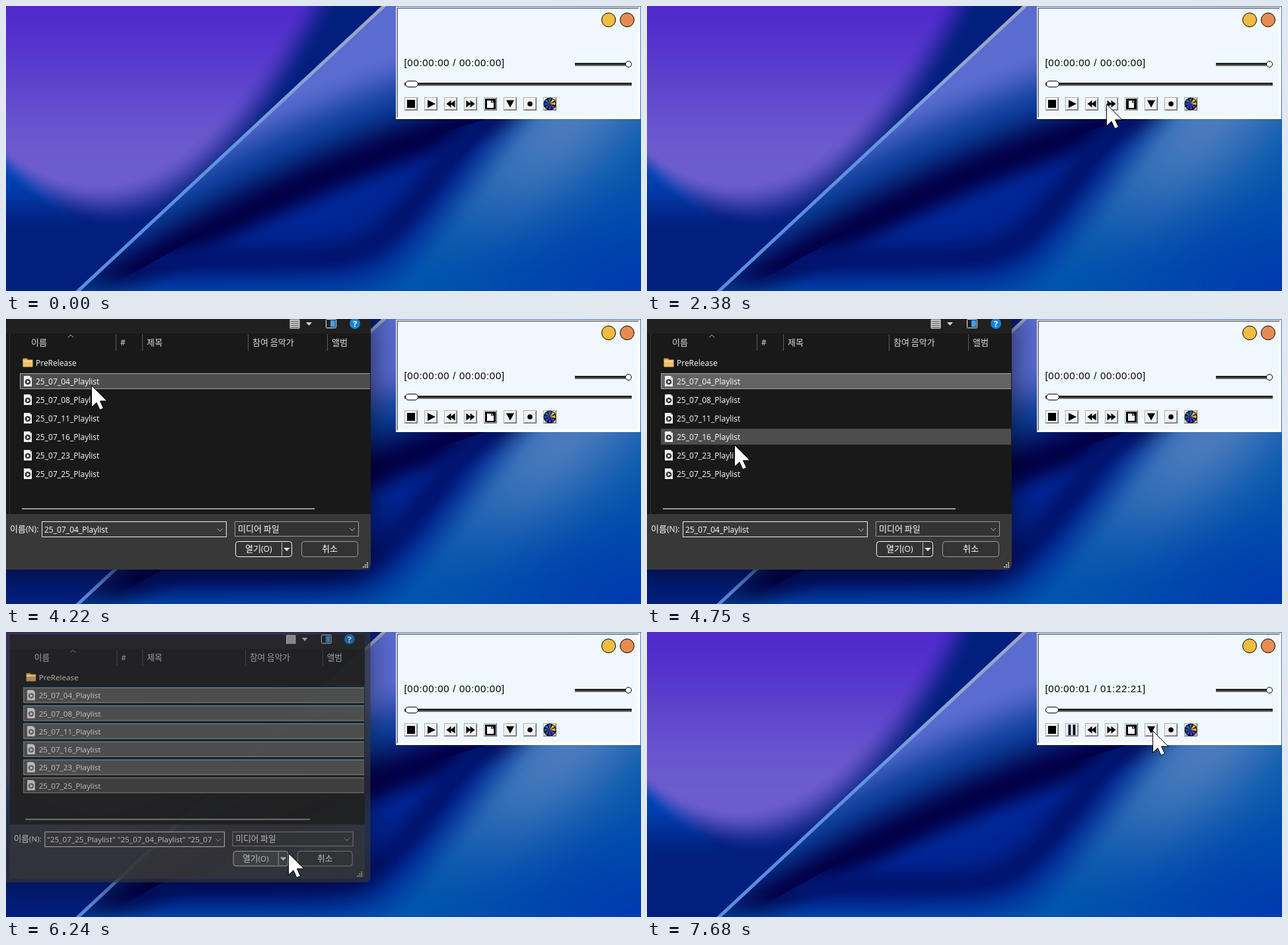
An HTML page with a canvas that plays this animation: 961x431 px, repeating every 8 s.

```html
<!DOCTYPE html>
<html lang="ko">
<head>
<meta charset="utf-8">
<title>Player and file dialog</title>
<style>
html, body { margin: 0; width: 100%; height: 100%; overflow: hidden; background: #00208a; }
canvas { display: block; }
</style>
</head>
<body>
<canvas id="stage" width="961" height="431"></canvas>
<script>
const W = 961, H = 431, LOOP = 8000, STEP = 67;
const c = document.getElementById('stage').getContext('2d');
const LATIN = "12px 'Open Sans', 'Noto Sans', sans-serif";
const HANGUL = "13px 'Noto Sans CJK KR', 'Noto Sans CJK', sans-serif";
const CLOCK = "15px 'Liberation Sans', Arial, sans-serif";

const clamp = v => Math.min(1, Math.max(0, v));
const smooth = (a, b, v) => {
  const p = clamp((v - a) / (b - a));
  return p * p * (3 - 2 * p);
};
const bell = (v, mid, width) => Math.exp(-(((v - mid) / width) ** 2));
const rgb = hex => [1, 3, 5].map(i => parseInt(hex.slice(i, i + 2), 16));
const mix = (a, b, p) => a.map((v, i) => v + (b[i] - v) * p);

// ---- drawing helpers ----
function rect(color, x, y, w, h) {
  c.fillStyle = color;
  c.fillRect(x, y, w, h);
}

function trace(pts) {
  c.beginPath();
  for (let i = 0; i < pts.length; i += 2) c.lineTo(pts[i], pts[i + 1]);
}

function poly(color, ...pts) {
  trace(pts);
  c.closePath();
  c.fillStyle = color;
  c.fill();
}

function line(color, width, ...pts) {
  trace(pts);
  c.strokeStyle = color;
  c.lineWidth = width;
  c.stroke();
}

// Triangle pointing along (dx, dy), centred on x, y
function arrow(color, x, y, len, half, dx, dy) {
  const bx = x - dx * len / 2, by = y - dy * len / 2;
  poly(color, x + dx * len / 2, y + dy * len / 2, bx - dy * half, by + dx * half, bx + dy * half, by - dx * half);
}

function finish(fill, stroke) {
  if (fill) { c.fillStyle = fill; c.fill(); }
  if (stroke) { c.strokeStyle = stroke; c.lineWidth = 1; c.stroke(); }
}

function disc(x, y, r, fill, stroke) {
  c.beginPath();
  c.arc(x, y, r, 0, 7);
  finish(fill, stroke);
}

function box(x, y, w, h, r, fill, stroke) {
  c.beginPath();
  c.roundRect(x + .5, y + .5, w - 1, h - 1, r);
  finish(fill, stroke);
}

function text(s, x, y, font = HANGUL, color = '#fff') {
  c.font = font;
  c.fillStyle = color;
  c.fillText(s, x, y);
}

function ramp(x0, y0, x1, y1, ...colors) {
  const g = c.createLinearGradient(x0, y0, x1, y1);
  colors.forEach((color, i) => g.addColorStop(i / (colors.length - 1), color));
  return g;
}

// ---- wallpaper: smooth fields on both sides of a slanted edge ----
const [violet, lilac, azure, navy, ink, deep, royal, slate, sheen, sea, cobalt, haze] =
  ['#4f29cc', '#6d5cce', '#0042b4', '#021f7e', '#020048', '#001470', '#002594',
   '#0a3c98', '#5a6cd0', '#0054ac', '#003cae', '#4a7abc'].map(rgb);

const edgeX = y => 572 - 463 * y / H;

function leftSide(x, y) {
  const hill = 300 - 65 * ((x - 150) / 150) ** 2;
  const spread = 22 + x / 12;
  const sky = mix(violet, lilac, smooth(-20, 250, y));
  const floor = mix(azure, navy, Math.max(smooth(250, 345, y), smooth(20, 120, x)));
  return mix(sky, floor, smooth(hill - spread, hill + spread, y));
}

function rightSide(x, y) {
  const d = x - 600;
  const u = y - (212 - .36 * d + .00027 * d * d);
  // Rounded corner between a floor and a slanted wall
  const floor = y - 408, wall = .8 * (x - 740 + .75 * (y - 180));
  const s = 30 * Math.log(Math.exp(floor / 30) + Math.exp(wall / 30));

  const above = mix(mix(ink, slate, smooth(0, -75, u)), sheen, smooth(-55, -150, u));
  const below = mix(mix(ink, royal, smooth(0, 50, u)), deep, bell(s, -25, 25));
  const outer = mix(sea, cobalt, smooth(600, W, x) * smooth(220, H, y));
  const lit = mix(outer, haze, bell(s, 85, 95) * smooth(430, 170, y));
  return mix(u < 0 ? above : below, lit, smooth(-20, 55, s));
}

function paintWallpaper() {
  const image = c.createImageData(W, H);
  for (let y = 0, i = 0; y < H; y++)
    for (let x = 0; x < W; x++, i += 4)
      image.data.set([...(x < edgeX(y) ? leftSide : rightSide)(x, y), 255], i);
  c.putImageData(image, 0, 0);
  const tint = ramp(edgeX(0), 0, edgeX(H), H, '#9ea6c4', '#8ca6d2', '#6096e0', '#5c8ce0', '#5c8ce0');
  line(tint, 5, edgeX(-5), -5, edgeX(H + 5), H + 5);
  const copy = document.createElement('canvas');
  copy.width = W;
  copy.height = H;
  copy.getContext('2d').drawImage(c.canvas, 0, 0);
  return copy;
}

// ---- player panel ----
const buttonX = i => 613 + 30 * i, BUTTON_Y = 148;

function button(i, pressed) {
  const x = buttonX(i), l = x - 10, t = BUTTON_Y - 10;
  rect(pressed ? '#808080' : '#696969', l, t, 20, 20);
  rect('#a8a8a8', l, t, 19, 19);
  rect('#fff', l + 1, t + 1, 18, 18);
  rect('#a0a0a0', l + 2, t + 2, 17, 17);
  rect(pressed ? '#e8eef8' : '#f0f0f0', l + 2, t + 2, 16, 16);
  return x;
}

function wheel(x, y) {
  const slice = Math.PI / 4;
  disc(x, y, 9.5, '#000');
  for (let i = 0; i < 8; i++) {
    const a = (i - .4) * slice;
    c.beginPath();
    c.moveTo(x, y);
    c.arc(x, y, 8.5, a, a + slice * .7);
    finish(['#e8b440', '#5038c8', '#2850b8', '#3068b8'][(i + 1) % 8 >> 1]);
  }
}

function page(x, y, inset) {
  rect('#000', x - 8, y - 8, 16, 16);
  const l = x - 5 + inset, r = x + 5 - inset;
  poly('#fff', l, y - 5, x + 1, y - 5, x + 1, y - 2, r, y - 2, r, y + 6, l, y + 6);
  poly('#fff', x + 2, y - 5, x + 5, y - 3, x + 2, y - 3);
}

function slider(x, y, w) {
  rect(ramp(0, y, 0, y + 5, '#111', '#333', '#9a9a90'), x, y, w, 5);
}

function buttons(t) {
  const y = BUTTON_Y, playing = t >= 6300, pressed = t >= 1985 && t < 2400;
  rect('#000', button(0) - 6, y - 6, 12, 12);
  const x = button(1, playing);
  if (playing) {
    for (const dx of [-6, 1]) {
      rect('#8c94b0', x + dx, y - 8, 5, 16);
      rect('#000', x + dx + 1, y - 8, 3, 16);
    }
  } else {
    arrow('#000', x + 1, y, 12, 6, 1, 0);
  }
  for (const dir of [-1, 1]) {
    const bx = button(dir < 0 ? 2 : 3);
    for (const dx of [-3, 3]) arrow('#000', bx + dx, y, 7, 5.5, dir, 0);
  }
  page(button(4, pressed), y, pressed ? 1 : 0);
  arrow('#000', button(5), y, 11, 6, 0, 1);
  disc(button(6), y, 3.8, '#000');
  wheel(button(7), y);
}

function panel(t) {
  ['#f4f6f8', '#a0a0a0', '#696969', '#f0f8ff'].forEach((color, i) => {
    rect('#fff', 590 + i, 1 + i, 370 - 2 * i, 170 - 2 * i);
    rect(color, 590 + i, 1 + i, 369 - 2 * i, 169 - 2 * i);
  });
  disc(912, 21, 10.5, '#f0bc42', '#000');
  disc(940, 21, 10.5, '#e68c52', '#000');

  const loaded = t >= 6650;
  const now = t >= 7680 ? '00:00:01' : '00:00:00';
  const total = loaded ? '01:22:21' : '00:00:00';
  c.letterSpacing = '0.7px';
  text(`[${now} / ${total}]`, 602.5, 91, CLOCK, '#000');
  c.letterSpacing = '0px';

  slider(861, 86, 82);
  disc(942, 88, 4.5, '#fff', '#000');
  slider(603, 116, 344);
  box(loaded ? 603 : 604, 113, 20, 10, 5, '#fff', '#000');
  buttons(t);
}

// ---- file dialog ----
const FILES = ['04', '08', '11', '16', '23', '25'].map(d => `25_07_${d}_Playlist`);
const rowY = i => 94 + 28 * i;
const PICK_ONE = 4220, PICK_ALL = 4890;

function chevron(x, y, dir = 1) {
  line('#b8b8b8', 1, x - 4, y - 2 * dir, x, y + 2 * dir, x + 4, y - 2 * dir);
}

function fileIcon(x, y) {
  poly('#f2f2f2', x, y - 8, x + 9, y - 8, x + 12, y - 5, x + 12, y + 8, x, y + 8);
  poly('#b0b0b0', x + 9, y - 8, x + 12, y - 5, x + 9, y - 5);
  disc(x + 6, y + 1, 4.3, '#333');
  arrow('#fff', x + 6.7, y + 1, 4, 2.5, 1, 0);
}

function folderIcon(x, y) {
  box(x, y - 7, 8, 6, 1, '#d9a441');
  box(x, y - 5, 16, 12, 1, '#f0c069');
  rect('#fbd98c', x + 1, y - 3, 14, 2);
}

function rowFill(i, t, hover) {
  const top = rowY(i) - 12, all = t >= PICK_ALL;
  if (!all && (t < PICK_ONE || i > 0)) {
    if (hover === i) rect('#4d4d4d', 21, top, 530, 24);
    return;
  }
  const focus = all ? i === 5 : hover === 0;
  rect(focus ? '#4d4d4d' : '#636363', 21, top, 530, 24);
  line('#a4a4a4', 1, 551, top + 23.5, 21.5, top + 23.5, 21.5, top + .5);
  line(all && !focus ? '#5cc4f4' : '#a8a8a8', 1, 21, top + .5, 551, top + .5);
}

function fileName(t) {
  if (t >= PICK_ALL) return [FILES[5], ...FILES].map(s => `"${s}"`).join(' ');
  return t >= PICK_ONE ? FILES[0] : '';
}

function toolbar() {
  box(429, 0, 16, 15, 1, '#d0d0d0');
  for (let y = 3; y < 14; y += 3) rect('#444', 431, y, 12, 1);
  arrow('#d8d8d8', 458.5, 7.5, 5, 4.5, 0, 1);
  box(484, 0, 16, 14, 1, '#202020', '#f0f0f0');
  rect('#3ba0ee', 491, 2, 7, 10);
  disc(528, 7, 8, '#1c80d8');
  text('?', 525, 12, "bold 13px 'Open Sans', sans-serif");
}

function listHeader() {
  const column = (s, x, font) => {
    text(s, x, 40, font, '#dedede');
    if (x > 38) rect('#5c5c5c', x - 7, 23, 1, 25);
  };
  column('이름', 38);
  column('#', 173, LATIN);
  column('제목', 213);
  column('참여 음악가', 373);
  column('앨범', 493);
  chevron(98, 26, -1);
}

function fileList(t, tip) {
  folderIcon(25, 66);
  text('PreRelease', 45, 71, LATIN);
  const hover = Math.floor((tip[1] - 80) / 28);
  FILES.forEach((name, i) => {
    rowFill(i, t, hover);
    fileIcon(27, rowY(i));
    text(name, 45, rowY(i) + 5, LATIN);
  });
  rect('#9c9c9c', 24, 286, 443, 2);
  if (t >= 5030 && t < 5700)
    for (const [x, dir] of [[14.5, -1], [543.5, 1]]) arrow('#343434', x, 287, 5, 3, dir, 0);
}

function footer(t) {
  text('이름', 6, 322);
  text('(N):', 30, 322, LATIN);
  box(54, 306, 280, 24, 0, '#383838', '#f0f0f0');
  c.save();
  c.beginPath();
  c.rect(56, 308, 258, 20);
  c.clip();
  text(fileName(t), 58, 323, LATIN);
  c.restore();
  if (t >= 3450 && t < 3960) rect('#fff', 58, 311, 1, 15);
  chevron(324, 319);
  box(346, 306, 188, 23, 0, '#333', '#9b9b9b');
  text('미디어 파일', 351, 322);
  chevron(524, 318);

  const over = t >= 5370;
  box(347, 336, 86, 24, 4, over ? '#454545' : '#333', over ? '#d0d0d0' : '#fff');
  rect('#c8c8c8', 417, 338, 1, 20);
  arrow('#e8e8e8', 425, 348.5, 5, 5, 0, 1);
  text('열기', 362, 352);
  text('(O)', 386, 352, LATIN);
  box(447, 336, 86, 24, 4, '#333', '#9b9b9b');
  text('취소', 478, 352);
  for (let i = 0; i < 3; i++)
    for (let j = 0; j <= i; j++) rect('#c0c0c0', 546 - 3 * j, 368 + 3 * i, 2, 2);
}

function drawDialog(t, tip) {
  const fade = from => clamp((Math.floor((t - from) / STEP) + 1) / 3);
  const a = fade(2450) - fade(6200);
  if (a <= 0) return;
  c.save();
  c.globalAlpha = a;
  c.shadowColor = 'rgba(0,0,20,.7)';
  c.shadowBlur = 50;
  c.shadowOffsetY = 10;
  box(-20, -20, 572, 399, 8, '#383838');
  c.shadowColor = 'transparent';

  const s = .92 + .08 * a;
  c.translate(220 * (1 - s), 150 * (1 - s));
  c.scale(s, s);
  c.beginPath();
  c.roundRect(-20, -20, 572, 399, 8);
  c.clip();
  rect('#383838', 0, 0, 552, 379);
  rect('#202020', 0, 0, 552, 22);
  rect('#191919', 0, 22, 552, 273);
  rect('#333', 5, 22, 1, 273);
  toolbar();
  listHeader();
  fileList(t, tip);
  footer(t);
  c.restore();
}

// ---- pointer ----
const hop = (from, to, x, y, bow = 0) => ({ from, to, x, y, bow });
const HOPS = [
  hop(500, 970, buttonX(4) + 4, 154, -22),
  hop(1180, 1310, buttonX(3) - 2, 146),
  hop(1450, 1720, buttonX(4) + 8, 151, 10),
  hop(1920, 2050, buttonX(4), 150),
  hop(2310, 3050, 224, 119),
  hop(3120, 3180, 228, 116),
  hop(3450, 3700, 129, rowY(0) + 6),
  hop(4420, 4890, 133, rowY(5) - 3),
  hop(5030, 5435, 408, 345),
  hop(5640, 5770, 406, 350),
  hop(6235, 6450, 540, 250),
  hop(6515, 6930, buttonX(4) + 1, 155),
  hop(7000, 7340, buttonX(5) + 2, 149, 8)
];

function pointer(t) {
  let x = 990, y = 188;
  for (const h of HOPS) {
    if (t < h.from) break;
    const n = Math.round((h.to - h.from) / STEP) + 1;
    const p = t >= h.to ? 1 : clamp((Math.floor((t - h.from) / STEP) + 1) / n);
    const e = smooth(0, 1, p);
    x += (h.x - x) * e;
    y += (h.y - y) * e + h.bow * Math.sin(Math.PI * p);
  }
  return [Math.round(x), Math.round(y)];
}

function drawPointer([x, y]) {
  c.save();
  c.translate(x + .5, y + .5);
  poly('#fff', 0, 0, 0, 33, 7.5, 26, 12.5, 37, 18, 34.5, 13, 23.5, 23.5, 23.5);
  finish(null, '#000');
  c.restore();
}

const wallpaper = paintWallpaper();

function draw() {
  const t = performance.now() % LOOP;
  const tip = pointer(t);
  c.drawImage(wallpaper, 0, 0);
  drawDialog(t, tip);
  panel(t);
  if (t >= 500) drawPointer(tip);
  requestAnimationFrame(draw);
}
draw();
</script>
</body>
</html>
```
